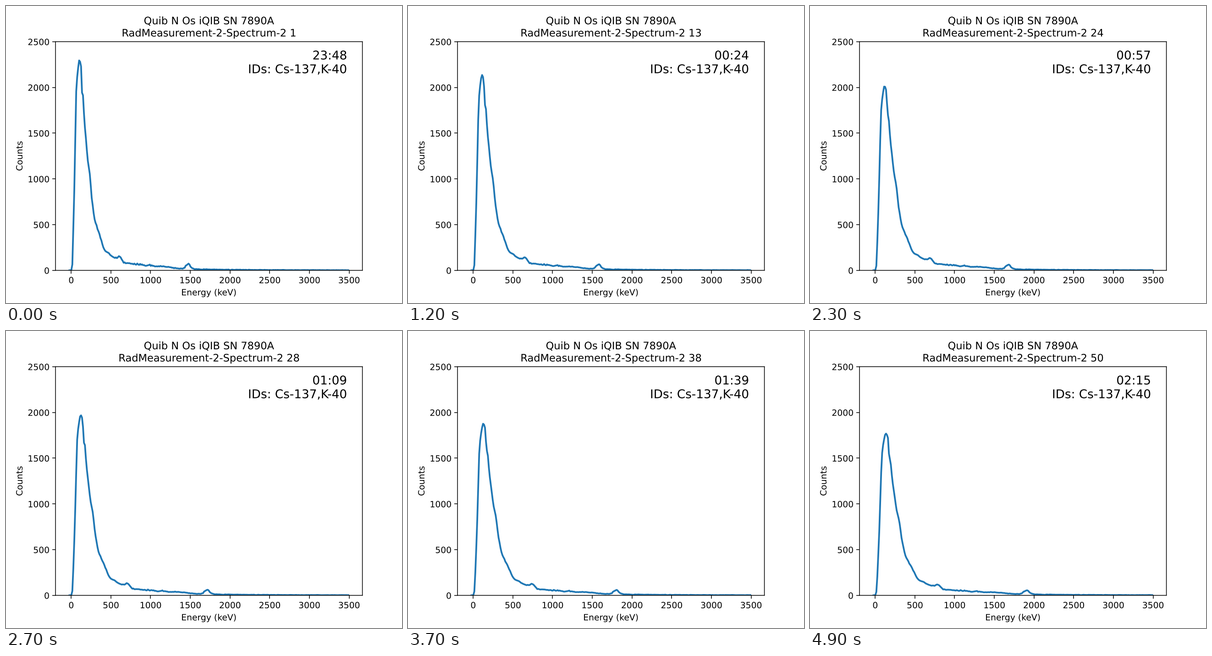
These frames come from a looping animation (864x648 px, 5000 ms). A matplotlib script:

```python
import numpy as np
import matplotlib.pyplot as plt
from matplotlib.animation import FuncAnimation
from matplotlib.patheffects import Normal
from matplotlib.text import Text

FRAMES, INTERVAL = 50, 100
GAIN_STEP = 0.006      # gain drift per measurement
BIN_WIDTH = 12.2       # keV
BINS = 289

# Corners of the smooth continuum: (keV, counts)
CONTINUUM = [
    (0, 0), (13, 25), (38, 850), (63, 1960), (77, 2145), (102, 2310),
    (126, 2220), (136, 1940), (148, 1925), (162, 1680), (206, 1220),
    (235, 1050), (260, 770), (296, 550), (360, 385), (410, 230),
    (500, 165), (570, 122), (640, 82), (900, 60), (1200, 38),
    (1350, 19), (1440, 17), (1580, 12), (2000, 6), (2600, 3), (3500, 1),
]

plt.rcParams["font.family"] = "DejaVu Sans"


def peak(energy, centre, height, sigma):
    return height * np.exp(-0.5 * ((energy - centre) / sigma) ** 2)


def base_spectrum(energy):
    """Undrifted counts: continuum, Cs-137 and K-40 peaks, counting noise."""
    counts = np.interp(energy, *zip(*CONTINUUM))
    counts += peak(energy, 613, 56, 24) + peak(energy, 1471, 50, 27)
    rng = np.random.default_rng(4)
    noise = 0.55 * rng.standard_normal(energy.size)
    return counts + noise * np.sqrt(np.minimum(counts, 60))


energy = -22.5 + BIN_WIDTH * np.arange(BINS)
base = base_spectrum(energy)

fig, ax = plt.subplots(figsize=(6.4, 4.8), dpi=135)
fig.subplots_adjust(left=0.125, right=0.9, bottom=0.11, top=0.88)
ax.set(xlim=(-198, 3668), ylim=(0, 2500),
       xticks=range(0, 3501, 500), yticks=range(0, 2501, 500),
       xlabel="Energy (keV)", ylabel="Counts")
line, = ax.plot([], [], color="C0", linewidth=2)
title = ax.set_title("", fontsize=12)
info = ax.text(0.95, 0.85, "", transform=ax.transAxes, fontsize=14,
               ha="right", va="bottom")

# Place frame and lettering at sub-pixel positions
for spine in ax.spines.values():
    spine.set_snap(False)
for text in fig.findobj(Text):
    text.set_path_effects([Normal()])


def update(frame):
    gain = 1 + GAIN_STEP * frame
    line.set_data(energy, np.interp(energy / gain, energy, base) / gain)
    title.set_text(f"Quib N Os iQIB SN 7890A\nRadMeasurement-2-Spectrum-2 {frame + 1}")
    hours, minutes = divmod((23 * 60 + 48 + 3 * frame) % 1440, 60)
    info.set_text(f"{hours:02d}:{minutes:02d}\nIDs: Cs-137,K-40")
    return line, title, info


anim = FuncAnimation(fig, update, frames=FRAMES, interval=INTERVAL,
                     init_func=lambda: update(0), repeat=True, repeat_delay=0)
plt.show()
```
